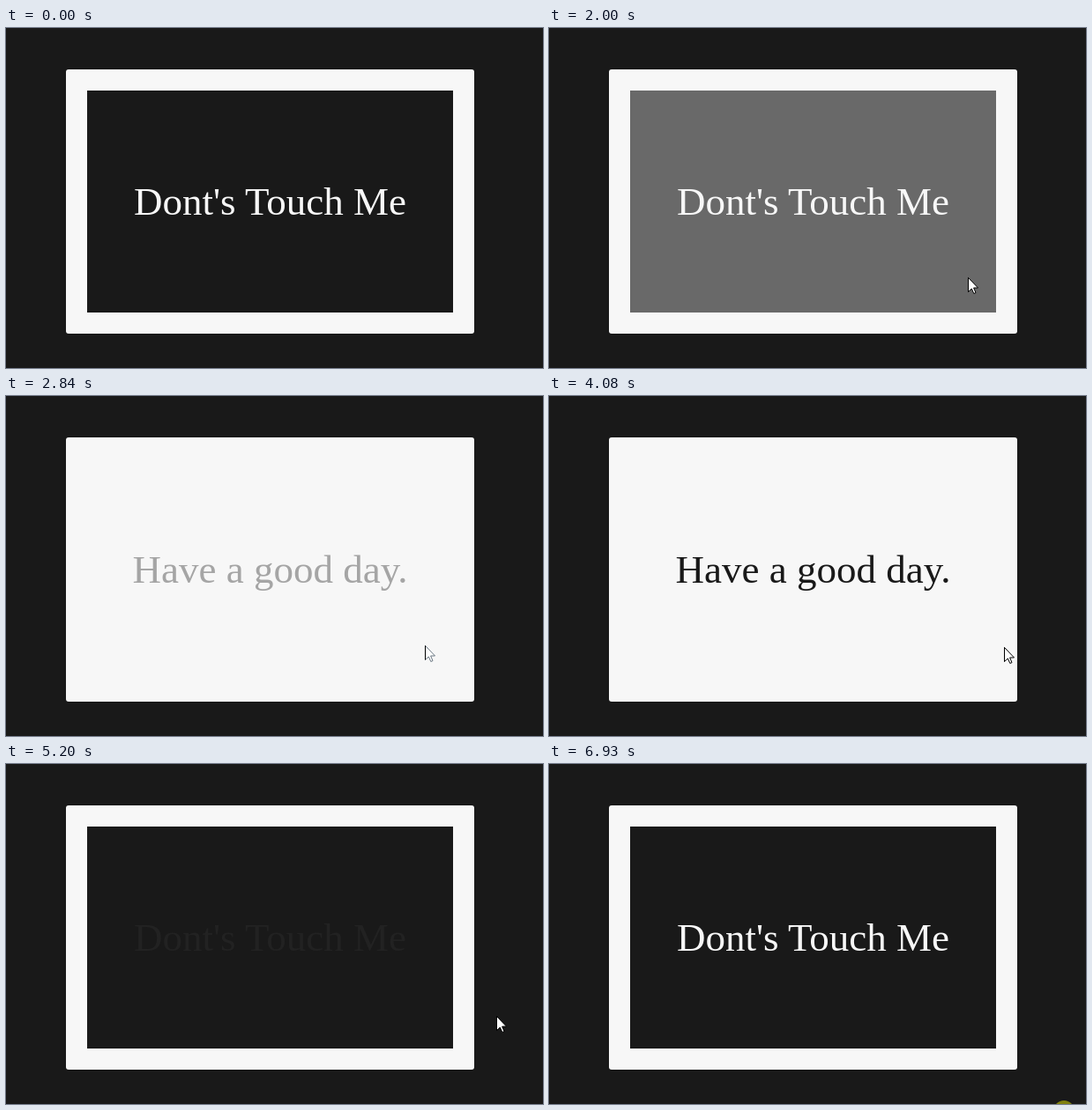
An HTML page for the animation above (7.06 s loop, 609x386 px).

```html
<!DOCTYPE html>
<html lang="en">
<head>
<meta charset="utf-8">
<title>Hover card</title>
<style>
  html, body { margin: 0; width: 100%; height: 100%; overflow: hidden; background: #191919; }
  svg { display: block; width: 609px; height: 386px; }
  text { font: 45px "Liberation Serif", "Times New Roman", serif; text-anchor: middle; }
</style>
</head>
<body>
<svg viewBox="0 0 609 386">
  <rect x="68" y="47" width="463" height="300" rx="3" fill="#f7f7f7"/>
  <rect id="panel" x="92" y="71" width="415" height="252" fill="#191919"/>
  <text id="label" x="299.5" y="212" fill="#f7f7f7">Dont's Touch Me</text>
  <circle id="glow" cx="584" cy="394" r="12" fill="#80800f" visibility="hidden"/>
  <g id="cursor" visibility="hidden">
    <path id="arrow" d="M.5 .5V16.5L4.3 13 6.8 18.5 9 17.6 6.6 12H11.5Z" fill="#fff" stroke="#000"/>
    <path d="M.5 .5V16.5" stroke="#000"/>
  </g>
</svg>
<script>
const LOOP = 7060, STEP = 70;
const DARK = 25, LIGHT = 247;
const [panel, label, glow, cursor, arrow] =
  ["panel", "label", "glow", "cursor", "arrow"].map(id => document.getElementById(id));

const between = (t, from, to) => t >= from && t < to;
const ramp = (t, from, to) => Math.min(1, Math.max(0, (t - from) / (to - from)));
const gray = k => {
  const v = Math.round(DARK + (LIGHT - DARK) * k);
  return `rgb(${v},${v},${v})`;
};
const show = (el, on) => el.setAttribute("visibility", on ? "visible" : "hidden");

// The picture advances in held steps; the long pause shifts their phase
function hold(t) {
  const phase = t < 3800 ? 40 : 20;
  return Math.max(0, Math.floor((t - phase) / STEP) * STEP + phase);
}

// The pointer rises into view, crosses onto the card, leaves it, drops away
function tipAt(t) {
  const rise = ramp(t, 100, 600);
  const enter = ramp(t, 740, 1930) ** 2;
  const leave = ramp(t, 3730, 4430);
  const drop = ramp(t, 5620, 6530);
  const x = 585 - 12 * rise - 98 * enter + 81 * leave + 21 * drop;
  const y = 384 - 80 * rise - 21 * enter + 3 * leave + 100 * drop;
  return [Math.round(x), Math.round(y)];
}

function draw(time) {
  const t = hold(time);
  panel.setAttribute("fill", gray(ramp(t, 1820, 2320) - ramp(t, 4498, 4998)));
  label.setAttribute("fill", gray(1 - ramp(t, 2470, 3470) + ramp(t, 5160, 6160)));

  // The words change while they match the panel colour
  const words = between(t, 2400, 5080) ? "Have a good day." : "Dont's Touch Me";
  if (label.textContent !== words) label.textContent = words;

  cursor.setAttribute("transform", `translate(${tipAt(t)})`);
  arrow.setAttribute("stroke", between(t, 2200, 3800) ? "#6b7883" : "#000");
  show(cursor, between(time, 130, 6530));
  show(glow, time >= 6930);
}

const begin = performance.now();
function tick() {
  draw((performance.now() - begin) % LOOP);
  requestAnimationFrame(tick);
}
tick();
</script>
</body>
</html>
```
